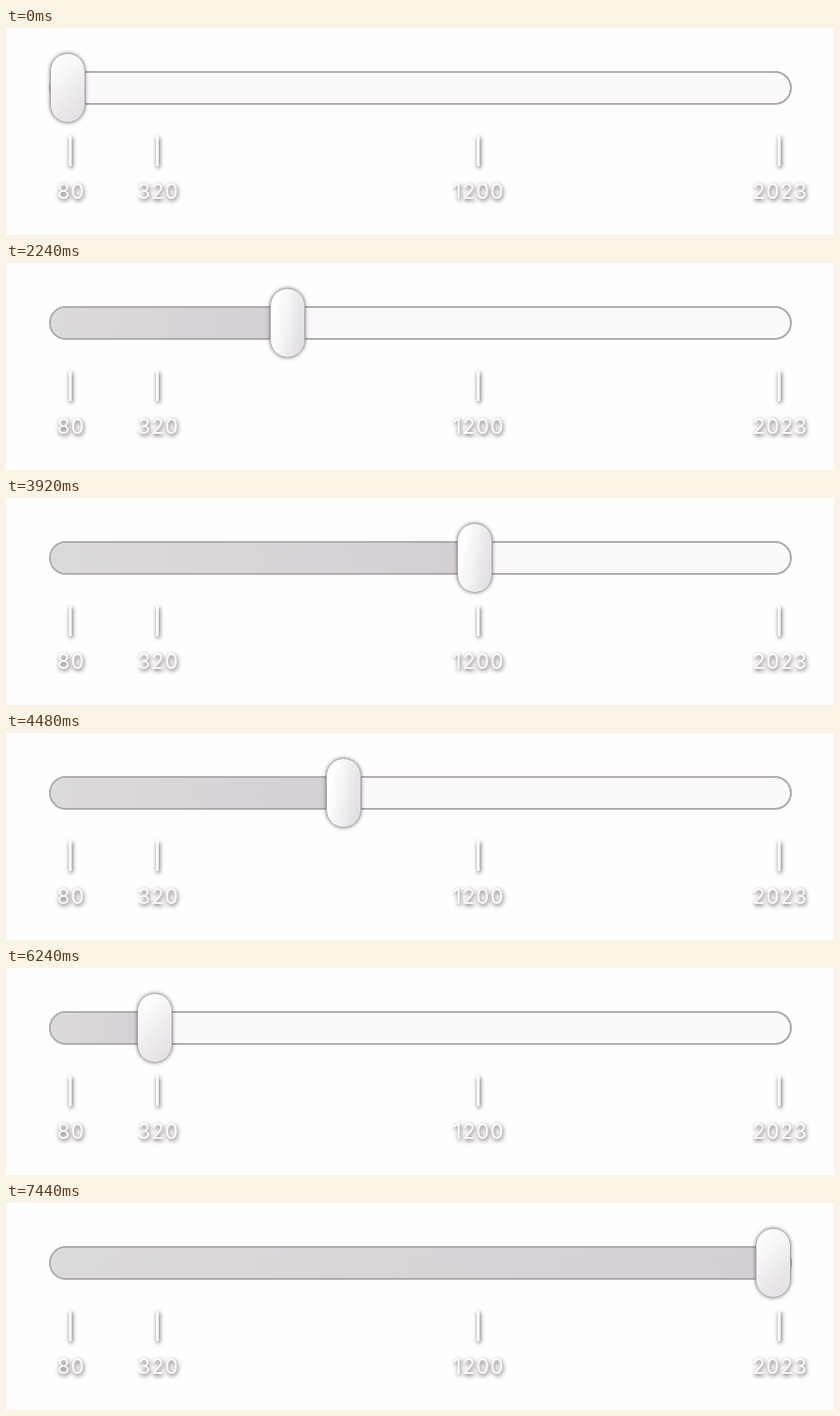
These frames come from a looping animation (960x240 px, 8720 ms). An HTML page:

```html
<!DOCTYPE html>
<html lang="en">
<head>
<meta charset="utf-8">
<title>Year slider</title>
<style>
  html, body { margin: 0; width: 100%; height: 100%; overflow: hidden; background: #fefefe; }
  .stage {
    --shade: 1px 2px 5px rgba(55, 30, 50, .85);
    position: relative; width: 960px; height: 240px; overflow: hidden;
  }
  .stage div { position: absolute; box-sizing: border-box; }
  .stage .track {
    left: 50px; top: 50px; width: 861px; height: 39px;
    border: 2px solid #aca7ab; border-radius: 20px;
    background: #fbf9fc; overflow: hidden;
    box-shadow: 0 0 1px rgba(110, 100, 110, .4);
  }
  .stage .fill {
    left: 0; top: 0; height: 100%;
    background: linear-gradient(100deg, #dddadd, #d3cfd4);
  }
  .stage .thumb {
    left: 0; top: 29px; width: 41px; height: 81px; border-radius: 20.5px;
    border: 1px solid #a19ba0;
    background: linear-gradient(135deg, #fefdfe 15%, #dfdadf) border-box;
    box-shadow: 0 0 4px rgba(60, 45, 60, .6);
  }
  .stage .thumb.held { background-image: linear-gradient(100deg, #fff 20%, #dcd8de); }
  .stage .tick {
    top: 125px; width: 3px; height: 35px; margin-left: -1.5px;
    background: #fff; box-shadow: var(--shade);
  }
  .stage .year {
    top: 175px; width: 100px; margin-left: -50px; text-align: center;
    font: 400 24px/30px Inter, Roboto, sans-serif; letter-spacing: 1.2px;
    color: #fff; text-shadow: var(--shade);
  }
</style>
</head>
<body>
<div class="stage">
  <div class="track"><div class="fill"></div></div>
  <div class="thumb"></div>
</div>
<script>
  const LOOP = 8720, STEP = 80;
  const stage = document.querySelector('.stage');
  const fill = document.querySelector('.fill');
  const thumb = document.querySelector('.thumb');

  // Each mark: year, tick x, label x
  const marks = [[80, 74, 75.5], [320, 175, 176.5], [1200, 547.5, 548], [2023, 896, 897.5]];

  function add(cls, x, text = '') {
    const el = document.createElement('div');
    el.className = cls;
    el.style.left = x + 'px';
    el.textContent = text;
    stage.append(el);
  }
  for (const [year, tickX, labelX] of marks) {
    add('tick', tickX);
    add('year', labelX, year);
  }

  const yearX = y => 71.5 + 818 * (y - 80) / (2023 - 80);

  // Drags as [time, thumb centre]; releasing snaps to the nearest mark
  const drags = [
    { path: [[1200, yearX(80)], [1680, 160], [2080, 259.5], [2720, 549], [2880, 576.5]],
      press: 960, release: 3040, snap: yearX(1200) },
    { path: [[4080, yearX(1200)], [4480, 391.5], [4960, 184.5]],
      press: 3920, release: 5120, snap: yearX(320) },
    { path: [[6400, yearX(320)], [6800, 435.5], [7280, yearX(2023)]],
      press: 6480, release: 7440, snap: yearX(2023) }
  ];

  // Monotone cubic through the points, at rest at both ends
  function along(path, t) {
    const last = path.length - 1;
    if (t <= path[0][0]) return path[0][1];
    if (t >= path[last][0]) return path[last][1];
    const slope = i => (path[i + 1][1] - path[i][1]) / (path[i + 1][0] - path[i][0]);
    const tangent = i => {
      if (i === 0 || i === last) return 0;
      const a = slope(i - 1), b = slope(i);
      return 2 * a * b / (a + b);
    };
    const i = path.findIndex(p => p[0] > t) - 1;
    const [t0, x0] = path[i], [t1, x1] = path[i + 1];
    const h = t1 - t0, u = (t - t0) / h, v = 1 - u;
    return x0 * v * v * (1 + 2 * u) + x1 * u * u * (3 - 2 * u)
      + h * u * v * (v * tangent(i) - u * tangent(i + 1));
  }

  function pose(t) {
    let x = yearX(80), held = false;
    for (const d of drags) {
      if (t < Math.min(d.press, d.path[0][0])) break;
      held = t >= d.press && t < d.release;
      x = t < d.release ? along(d.path, t) : d.snap;
    }
    return { x, held };
  }

  function draw(now) {
    const t = Math.floor(now % LOOP / STEP) * STEP;
    const { x, held } = pose(t);
    thumb.style.transform = `translateX(${Math.round(x - 20.5)}px)`;
    thumb.classList.toggle('held', held);
    fill.style.width = x - 52 + 'px';
  }

  const start = performance.now();
  function frame() {
    draw(performance.now() - start);
    requestAnimationFrame(frame);
  }
  frame();
</script>
</body>
</html>
```
